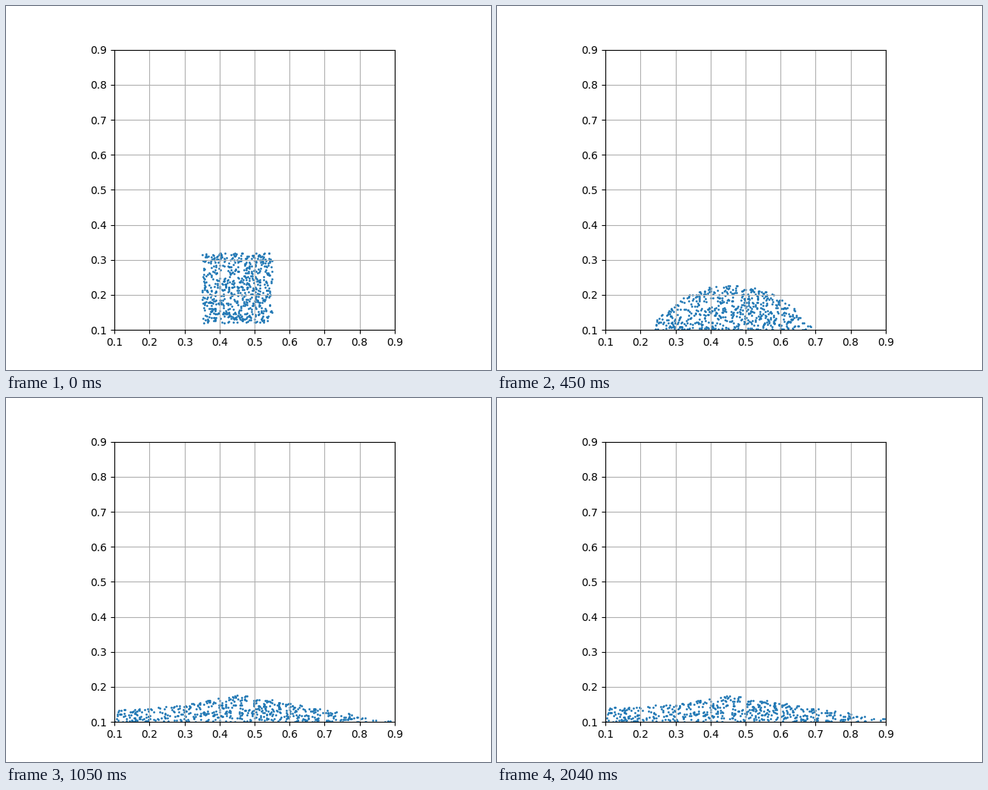
A matplotlib script that plays this animation: 640 by 480 pixels, repeating every 2100 ms.

```python
import numpy as np
import matplotlib.pyplot as plt
from matplotlib.animation import FuncAnimation

FRAMES, INTERVAL = 70, 30
COUNT = 650
FLOOR, FALL = 0.092, 0.028
LEFT_WALL, RIGHT_WALL, CENTRE = 0.095, 0.905, 0.458
IMPACT, SLUMP, REST = 5, 11, 51  # frames at which the motion changes

rng = np.random.default_rng(7)
u, v = rng.random((2, COUNT))
block = np.column_stack([0.35 + 0.2 * u, 0.12 + 0.2 * v])
xs = np.linspace(LEFT_WALL, RIGHT_WALL, 1601)


def pile_height(left):
    """Surface above the floor; left runs from 1 (slumping) to 0 (at rest)."""
    peak = 0.084 + 0.076 * left**3.8
    half_width = 0.56 - 0.384 * left**1.85
    roundness = 1 + 3 * left**7.5
    bank = 0.018 * np.clip((0.73 - left) / 0.15, 0, 1)
    mound = peak * (1 - np.abs((xs - CENTRE) / half_width) ** roundness)
    return np.maximum(mound, 0) + bank * np.exp(-(((xs - LEFT_WALL) / 0.12) ** 2))


def layer_mass(s, k):
    """Mass above a point s of the base when lower layers spread by up to 1 + k."""
    top = np.clip(1 - (2 * np.abs(s) - 1) / k, 0, 1)
    return np.log((1 + k) / (1 + k - k * top))


def cumulative(y):
    total = np.cumsum(y)
    return total / total[-1]


def fill_pile(frame):
    """Spread the block evenly under the surface, keeping the order of its layers."""
    left = 1 - min((frame - SLUMP) / (REST - SLUMP), 1)
    k = 1.3 - 0.6 * left**3
    s = (u - 0.5) * (1 + k * (1 - v))
    base = np.linspace(-0.5 - k / 2, 0.5 + k / 2, 1001)
    share = np.interp(s, base, cumulative(layer_mass(base, k)))
    height = pile_height(left)
    x = np.interp(share, cumulative(height), xs)
    rank = np.log((1 + k) / (1 + k - k * v)) / np.maximum(layer_mass(s, k), 1e-9)
    return np.column_stack([x, FLOOR + rank * np.interp(x, xs, height)])


def positions(frame):
    if frame >= SLUMP:
        return fill_pile(frame)
    fallen = block - [0, FALL * min(frame / IMPACT, 1) ** 2]
    t = max(frame - IMPACT, 0) / (SLUMP - IMPACT)
    return fallen + (fill_pile(SLUMP) - fallen) * [t**1.5, t]


fig, ax = plt.subplots(figsize=(6.4, 4.8), dpi=100)
ax.set_aspect("equal")
ax.set_xlim(0.1, 0.9)
ax.set_ylim(0.1, 0.9)
ticks = np.linspace(0.1, 0.9, 9)
ax.set_xticks(ticks)
ax.set_yticks(ticks)
ax.grid(True)
grains = ax.scatter(block[:, 0], block[:, 1], s=1, color="tab:blue")


def update(frame):
    grains.set_offsets(positions(frame))
    return grains,


anim = FuncAnimation(fig, update, frames=FRAMES, interval=INTERVAL, repeat=True)
plt.show()
```
